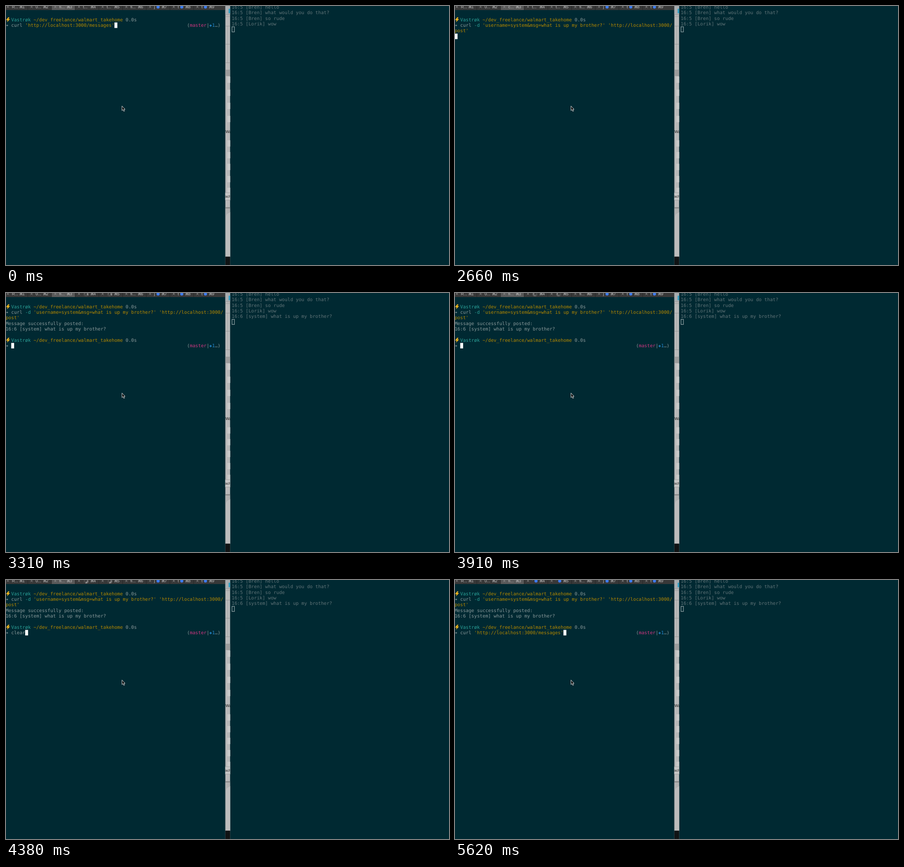
Write an HTML page that moves like this. It is 977 by 573 pixels and loops after 8 s.

```html
<!DOCTYPE html>
<html lang="en">
<head>
<meta charset="utf-8">
<title>Terminal session</title>
<style>
  html, body { margin: 0; width: 100%; height: 100%; overflow: hidden; background: #002932; }
  svg { display: block; }
  text { white-space: pre; text-rendering: geometricPrecision; }
  .mono { font: 10.22px "DejaVu Sans Mono", monospace; }
  .ui { font: 9px "Liberation Sans", sans-serif; }
  .key { font: 8.5px "DejaVu Sans", sans-serif; }
</style>
</head>
<body>
<svg id="stage" width="977" height="573" viewBox="0 0 977 573"></svg>
<script>
const LOOP = 8000, COL = 6.153, ROW = 12.33;
const TAB = 52.25;
const C = {
  bg: '#002932', text: '#8b9a9b', dim: '#617478', cyan: '#2aa198', gold: '#b58900',
  pink: '#d33682', blue: '#268bd2', tab: '#383838', active: '#595959', label: '#c4c4c4', dot: '#3f7df0'
};
const stage = document.getElementById('stage');
const timed = [];

function add(tag, attrs, parent = stage, content = '') {
  const el = document.createElementNS('http://www.w3.org/2000/svg', tag);
  for (const key in attrs) el.setAttribute(key, attrs[key]);
  el.textContent = content;
  return parent.appendChild(el);
}
const rect = (x, y, width, height, fill, parent, extra) =>
  add('rect', { x, y, width, height, fill, ...extra }, parent);
const write = (x, y, content, fill, cls, parent) =>
  add('text', { x, y, fill, class: cls }, parent, content);

// A group that is visible only from one time to another.
function during(from, to, parent = stage) {
  const el = add('g', {}, parent);
  timed.push({ el, from, to });
  return el;
}

// ---- left terminal ----
const colX = col => -0.8 + col * COL;
const put = (row, col, content, fill, parent) =>
  write(colX(col), 33.6 + row * ROW, content, fill, 'mono', parent);
const block = (row, col, parent) =>
  rect(colX(col), 24.1 + row * ROW, 6.4, 12.2, '#fff', parent);

function prompt(row, parent) {
  const y = 24 + row * ROW;
  add('path', { d: `M5 ${y + 1}L0 ${y + 7.2}H3.6L2.2 ${y + 12}L9 ${y + 4.8}H5.2L7.6 ${y + 1}Z`, fill: '#f9b81c' }, parent);
  put(row, 2, 'Vastrøk', C.cyan, parent);
  put(row, 10, '~/dev_freelance/walmart_takehome', C.gold, parent);
  put(row, 43, '0.0s', C.text, parent);
  const a = y + ROW + 6.6;
  add('path', { d: `M0 ${a - .5}H2V${a - 2}L5 ${a}L2 ${a + 2}V${a + .5}H0Z`, fill: '#7b8c8f' }, parent);
}
function gitStatus(row, parent) {
  put(row, 65, '(', C.text, parent);
  put(row, 66, 'master', C.pink, parent);
  put(row, 72, '|', C.text, parent);
  put(row, 73, '✚', C.blue, parent);
  put(row, 74, '1', C.blue, parent);
  put(row, 75, '…', C.text, parent);
  put(row, 76, ')', C.text, parent);
}
function getCommand(row, parent) {
  put(row, 2, 'curl', C.text, parent);
  put(row, 7, "'http://localhost:3000/messages'", C.gold, parent);
  block(row, 39, parent);
  gitStatus(row, parent);
}
function postCommand(row, parent) {
  put(row, 2, 'curl', C.text, parent);
  put(row, 7, '-d', C.cyan, parent);
  put(row, 10, "'username=system&msg=what is up my brother?'", C.gold, parent);
  put(row, 55, "'http://localhost:3000/", C.gold, parent);
  put(row + 1, 0, "post'", C.gold, parent);
}

rect(0, 0, 977, 573, C.bg);
prompt(0);
getCommand(1, during(0, 500));
postCommand(1, during(500, LOOP));
block(2, 5, during(500, 2660));
block(3, 0, during(2660, 2840));

const reply = during(2840, LOOP);
put(3, 0, 'Message successfully posted:', C.text, reply);
put(4, 0, '16:6 [system] what is up my brother?', C.text, reply);
block(5, 0, during(2840, 2990));

prompt(6, during(2990, LOOP));
const idle = during(2990, 4060);
block(7, 2, idle);
gitStatus(7, idle);
const recalled = during(4060, 4380);
postCommand(7, recalled);
block(8, 5, recalled);
const clear = during(4380, 4920);
put(7, 2, 'clear', C.text, clear);
block(7, 7, clear);
gitStatus(7, clear);
getCommand(7, during(4920, LOOP));

// ---- tab bar ----
rect(0, 0, 483.5, 9, C.tab);
rect(100, 0, 52, 9, C.active);
const label = (i, content, parent) => write(13 + i * TAB, 5.3, content, C.label, 'ui', parent);
const dot = (i, parent) => add('circle', { cx: 21.9 + i * TAB, cy: 2.2, r: 3.4, fill: C.dot }, parent);

for (let i = 0; i < 9; i++) {
  const x = i * TAB;
  if (i) rect(x - 4.6, 0, .8, 9, '#232323');
  add('path', { d: `M${x + 1.8} -.4l4.8 4.8m0 -4.8l-4.8 4.8`, stroke: '#9a9a9a', 'stroke-width': .9 });
  write(x + 29, 5.2, '⌘', C.label, 'key');
  write(x + 36.2, 5.2, i + 1, C.label, 'ui');
}
label(0, 'R...');
label(1, '0...');
label(2, 'fi...', during(0, 2660));
label(2, 'c...', during(2660, 2990));
label(2, 'fi...', during(2990, LOOP));
label(5, 'fi...');
['j', 't', 't'].forEach((name, k) => {
  label(6 + k, name);
  dot(6 + k);
});

const spinners = [[3, 5270], [4, 5620]].map(([i, end]) => {
  label(i, 't...', during(0, 3160));
  const busy = during(3160, end);
  const spokes = Array.from({ length: 12 }, (_, k) => add('path', {
    d: 'M0 -2.6V-5.4', stroke: '#d0d0d0', 'stroke-width': 1.1, 'stroke-linecap': 'round',
    transform: `translate(${19.8 + i * TAB} 2) rotate(${k * 30})`
  }, busy));
  const done = during(end, LOOP);
  label(i, "'", done);
  dot(i, done);
  return spokes;
});
const ticks = [3160, 3310, 3460, 3610, 3760, 3910, 4060, 4200, 4380, 4560, 4740, 4920, 5090, 5270, 5450];

// ---- window sliver between the panes ----
const sliver = add('svg', { x: 483.5, y: 0, width: 11, height: 573, overflow: 'hidden' });
rect(0, 0, 11, 573, '#b9b9b9', sliver);
rect(0, 0, 11, 19, '#a9adb0', sliver);
rect(7.5, 6, 3.5, 10, '#2f9fc4', sliver);
rect(4.5, 44, .8, 81, '#a4a4a4', sliver);
for (const y of [19, 23, 44, 84, 125, 141]) rect(0, y, 11, .8, '#929292', sliver);
rect(0, 142, 11, 13, '#9c9c9c', sliver);
for (const y of [156, 185, 214, 243, 297, 323, 349, 376, 402])
  rect(4.5, y, 7, y < 400 ? 14 : 11, '#c9c9c9', sliver);
write(.5, 281.3, 'Wa', '#151515', 'ui', sliver);
rect(-1, 413, 13, 16.5, '#c6c6c6', sliver, { stroke: '#9a9a9a', 'stroke-width': .8 });
write(-.4, 424.4, 'ach', '#222', 'ui', sliver).style.fontSize = '8px';
rect(0, 445, 11, 3, '#8d8d8d', sliver);
rect(0, 448, 11, 107, '#b0b0b0', sliver);
add('path', { d: 'M1 555V466Q2 458 11 456V555Z', fill: '#bdbdbd', stroke: '#a2a2a2', 'stroke-width': .6 }, sliver);
rect(0, 554.5, 11, 19, '#101314', sliver);

// ---- right terminal ----
const chat = (row, content, parent) => write(497.8, 5.9 + row * ROW, content, C.dim, 'mono', parent);
const hollow = (row, parent) => rect(498.4, -3.4 + row * ROW, 5.4, 11.4, 'none', parent,
  { stroke: '#c3cccd', 'stroke-width': .9 });
['[Bren] hello', '[Bren] what would you do that?', '[Bren] so rude', '[Lorik] wow']
  .forEach((line, row) => chat(row, '16:5 ' + line));
hollow(4, during(0, 2840));
const posted = during(2840, LOOP);
chat(4, '16:6 [system] what is up my brother?', posted);
hollow(5, posted);

// ---- mouse pointer ----
add('path', {
  d: 'M255.8 221.2V231.2L258.1 229.2L259.8 233L261.5 232.2L259.9 228.6H262.6Z',
  fill: '#0a0a0a', stroke: '#f2f2f2', 'stroke-width': .9, 'stroke-linejoin': 'round'
});

function render(t) {
  for (const { el, from, to } of timed)
    el.style.display = t >= from && t < to ? '' : 'none';
  const head = 2 * ticks.filter(tick => tick <= t).length;
  for (const spokes of spinners)
    spokes.forEach((spoke, k) => {
      const age = (head - k + 120) % 12;
      spoke.style.opacity = Math.max(.2, 1 - age / 11);
    });
}
const start = performance.now();
function loop() {
  render((performance.now() - start) % LOOP);
  requestAnimationFrame(loop);
}
loop();
</script>
</body>
</html>
```
